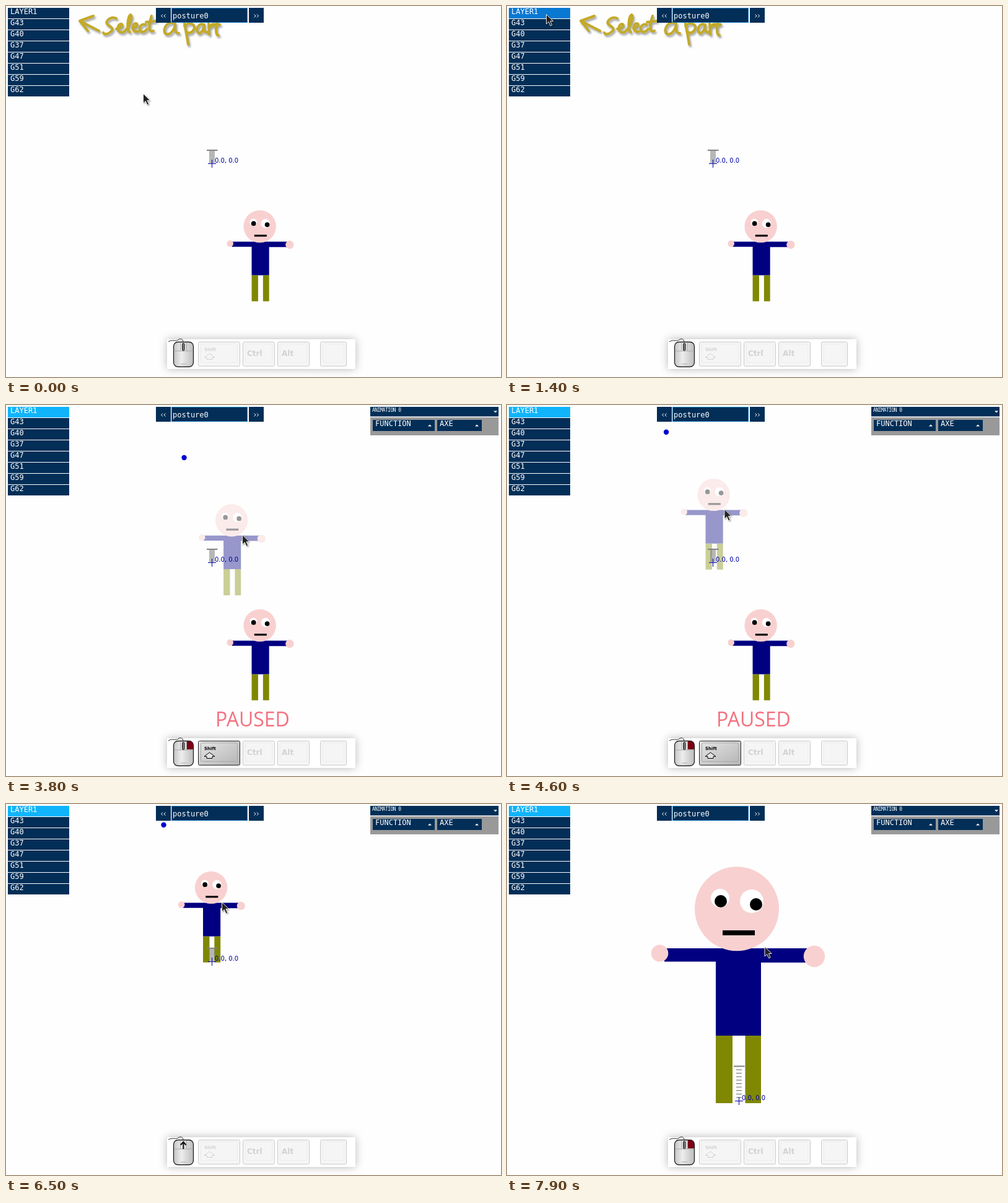
Animation of 799 by 599 pixels, one loop 8000 ms. Source, as an HTML page:

```html
<!DOCTYPE html>
<html lang="en">
<head>
<meta charset="utf-8">
<title>Posture editor</title>
<style>
html, body { margin: 0; width: 100%; height: 100%; overflow: hidden; background: #fefefe; }
svg { display: block; width: 799px; height: 599px; }
text { white-space: pre; }
.mono { font: 12px "DejaVu Sans Mono", monospace; fill: #fff; }
.tiny { font: 8px "DejaVu Sans Mono", monospace; letter-spacing: -.6px; fill: #fff; }
.coord { font: 10px "DejaVu Sans", sans-serif; fill: #0000a4; }
.paused { font: 32px "Open Sans", "Noto Sans", sans-serif; fill: #f4717f; }
.bar { fill: #022e57; }
.ink { fill: none; stroke: #c3aa27; stroke-width: 4; stroke-linecap: round; stroke-linejoin: round;
  filter: drop-shadow(2px 3px 1.5px rgba(0, 0, 0, .35)); }
.line { fill: none; stroke: #fff; stroke-width: 1; }

.skin { fill: #f9d0d0; }
.shirt { fill: #000080; }
.legs { fill: #7f8800; }
.eye { fill: #fff; }
.dark { fill: #000; }
.lit .skin { fill: rgba(38, 255, 1, .65); }
.lit .shirt { fill: #0eb135; }
.lit .legs { fill: #3fea05; }
.lit .eye { fill: rgba(20, 255, 10, .6); }
.lit .dark { fill: #10ff06; }

.cap { fill: #f5f5f5; stroke: #cacaca; }
.inner { fill: none; stroke: #ededed; }
.key text { font: bold 12px "DejaVu Sans", sans-serif; fill: #d2d2d2; }
.key .small { font-size: 7px; }
.up { fill: none; stroke: #d2d2d2; }
.on .cap { fill: url(#steel); stroke: #222; }
.on .inner { stroke: #aaa; }
.on text { fill: #000; }
.on .up { stroke: #000; fill: #e4e4e4; }
</style>
</head>
<body>
<svg viewBox="0 0 799 599">
  <defs>
    <linearGradient id="steel" x2="1" y2="1">
      <stop stop-color="#e6e6e6"/><stop offset="1" stop-color="#b4b4b4"/>
    </linearGradient>
    <linearGradient id="shell" x2="1">
      <stop stop-color="#c4c4c4"/><stop offset=".4" stop-color="#ededed"/><stop offset="1" stop-color="#bdbdbd"/>
    </linearGradient>
    <!-- doll in zoomed units, relative to the origin cross -->
    <g id="doll"><g transform="translate(-374.5 -479.5)">
      <path class="shirt" d="M254 233H487V256H410V374H337V254.5H254z"/>
      <path class="legs" d="M337 374h27v109h-27zM384.5 374H410v109h-25.5z"/>
      <circle class="skin" cx="246.5" cy="241" r="13.8"/>
      <circle class="skin" cx="496" cy="246" r="17.2"/>
      <circle class="skin" cx="371" cy="169.3" r="68"/>
      <circle class="eye" cx="344" cy="152" r="15"/>
      <circle class="eye" cx="395" cy="157" r="19"/>
      <circle class="dark" cx="345" cy="157" r="10"/>
      <circle class="dark" cx="402" cy="162" r="10"/>
      <path class="dark" d="M348 204h52v8h-52z"/>
    </g></g>
  </defs>
  <rect width="799" height="599" fill="#fefefe"/>

  <g id="hint" class="ink">
    <path d="M150 40L119 24L141 16M119 24L132 40"/>
    <path d="M178 20C170 15 158 25 164 30C172 35 175 38 167 43C163 46 158 46 157 43"/>
    <path d="M178 37C188 36 190 28 185 29C178 31 178 45 190 42C200 34 205 14 201 14C196 16 194 42 200 42"/>
    <path d="M204 36C212 34 214 28 209 28C202 30 203 44 213 41M225 30C216 27 212 41 220 42C224 42 226 39 228 37"/>
    <path d="M235 16C230 30 229 44 238 40M226 26L242 24"/>
    <path d="M272 28C262 22 250 38 258 45C266 48 273 36 273 28C272 38 273 44 279 44"/>
    <path d="M288 28C290 40 293 54 294 62M288 32C296 24 308 30 303 38C300 44 294 44 291 42"/>
    <path d="M319 30C310 26 305 40 311 44C317 44 320 34 320 30C319 38 320 44 326 42"/>
    <path d="M327 28L328 46M328 36C330 30 334 28 338 30M341 22C338 36 338 48 343 47M332 32L345 30"/>
  </g>

  <g id="list"></g>
  <path class="bar" d="M242 3h24v24h-24zM392 3h24v24h-24z"/>
  <rect class="bar" x="267.5" y="3.5" width="122" height="23" stroke="#1478bd"/>
  <path class="line" d="M253 13.5l-2.5 2.5 2.5 2.5M257.500 13.500l-2.500 2.500 2.500 2.500M400.500 13.500l2.500 2.500-2.500 2.500M405 13.500l2.500 2.500-2.500 2.500"/>
  <text class="mono" x="269" y="20">posture0</text>

  <g id="panel">
    <path class="bar" d="M588 3h207v15.500H588z"/>
    <path fill="#999" d="M588 20h207v29H588z"/>
    <path class="bar" d="M592 24h100v18H592zM696 24h72v18H696z"/>
    <path fill="#fff" d="M787 9.500h6l-3 3zM681 34.500h6l-3-3zM757 34.500h6l-3-3z"/>
    <text class="tiny" x="591" y="10.500">ANIMATION 0</text>
    <text class="mono" x="596" y="34">FUNCTION</text>
    <text class="mono" x="700" y="34">AXE</text>
  </g>

  <use id="figure" href="#doll"/>
  <use id="ghost" href="#doll" opacity=".4"/>
  <g id="ruler" fill="none"></g>
  <g id="origin">
    <path id="cross" fill="none" d="M-6.500 0H6.500M0 -6.500V6.500"/>
    <text class="coord" x="4.500" y="-1.500">0.0, 0.0</text>
  </g>
  <circle id="dot" r="4.200" fill="#0000d2"/>
  <text id="paused" class="paused" x="338" y="519">PAUSED</text>

  <rect x="260" y="538" width="304" height="48" fill="#fff" style="filter:drop-shadow(0 0 7px rgba(0,0,0,.28))"/>
  <path d="M262 542C268 538 274 542 278 539S286 538 286 543" fill="none" stroke="#222"/>
  <rect x="270.500" y="542.500" width="32" height="40" rx="7" fill="url(#shell)" stroke="#222" stroke-width="1.300"/>
  <path id="left" d="M282 543V556H271V549Q271 543 277 543z" fill="#7a0014"/>
  <path id="right" d="M292 543V556H302V549Q302 543 296 543z" fill="#7a0014"/>
  <path d="M271 557H302M281.500 543V557M291.500 543V557" stroke="#aaa" fill="none"/>
  <path d="M282 578h9" stroke="#aaa"/>
  <rect id="wheel" x="284.500" y="544.500" width="3.500" height="12" rx="1.700" fill="#777" stroke="#222"/>
  <path id="scroll" d="M286.300 557V546M282 550.500L286.300 545.500L290.500 550.500" fill="none" stroke="#111" stroke-width="2"/>
  <g id="keys"></g>

  <path id="cursor" d="M0 0V15.500L3.700 12L6.600 18.500L9.200 17.300L6.400 11H11.200z" fill="#222" stroke="#fff" stroke-width=".9"
    style="filter:drop-shadow(1px 1.500px 1px rgba(0,0,0,.4))"/>
</svg>
<script>
const $ = id => document.getElementById(id);
const LOOP = 8000, STEP = 100, ZOOM = 1.1 ** 10;
const PIVOT = [348.5, 158.5], ORIGIN = [332.5, 254.5], HOME = [78.5, 221];

$("list").innerHTML = ["LAYER1", "G43", "G40", "G37", "G47", "G51", "G59", "G62"].map((name, i) =>
  `<rect class="bar" x="3" y="${3 + 18 * i}" width="99" height="17"/>
   <text class="mono" x="7" y="${13 + 18 * i}">${name}</text>`).join("");
const layer = $("list").firstElementChild;

const key = (x, w, label) => `<g class="key">
  <rect class="cap" x="${x + .5}" y="542.5" width="${w - 1}" height="39" rx="2"/>
  <rect class="inner" x="${x + 4.5}" y="545.5" width="${w - 9}" height="30" rx="2"/>${label}</g>`;
$("keys").innerHTML =
  key(310, 68, `<text class="small" x="320" y="557">Shift</text>
    <path class="up" d="M328.5 561L337 567.500H333V570.500H324V567.500H320z"/>`) +
  key(382, 52, `<text x="389" y="565">Ctrl</text>`) +
  key(438, 52, `<text x="445" y="565">Alt</text>`) +
  key(507, 43, "");
const shift = $("keys").firstElementChild;

// Rows are [time, x, y], joined by straight motion.
const pointer = [[0, 221.5, 141.5], [600, 350, 286], [700, 350, 286], [1300, 63.5, 13.5], [1700, 63.5, 13.5],
  [1800, 199.5, 110.5], [1900, 199.5, 110.5], [2200, 441, 452], [2300, 434, 440], [2400, 434, 440], [2500, 427, 379.5]];
const drag = [[3200, 0, 0], [3900, -53, -198], [4200, -70, -206], [4600, -76, -211], [4700, -78, -212.5],
  [4800, -78, -212.5], [5700, -78.5, -221]];
const pan = [[7000, 0, 0], [7400, 26.5, 40], [7800, 65.5, 72], [7900, 67.5, 72]];

function at(track, t) {
  const i = track.findIndex(row => row[0] > t);
  if (i === 0) return track[0].slice(1);
  if (i < 0) return track[track.length - 1].slice(1);
  const a = track[i - 1], b = track[i], k = (t - a[0]) / (b[0] - a[0]);
  return [1, 2].map(n => a[n] + (b[n] - a[n]) * k);
}
const add = (...points) => points.reduce((p, q) => [p[0] + q[0], p[1] + q[1]]);
const place = (id, [x, y], scale = 1) =>
  $(id).setAttribute("transform", `translate(${x} ${y}) scale(${scale})`);
const show = (id, on) => { $(id).style.display = on ? "" : "none"; };

function drawRuler([x, y], zoom) {
  const gap = 2.16 * zoom;
  let ticks = "";
  for (let i = 1; i < 10; i++) ticks += `M${x - 4.5} ${y - gap * i}h9`;
  $("ruler").innerHTML = `<path d="${ticks}" stroke="#666"/>
    <path d="M${x - 8.5} ${y - gap * 10}h17.500" stroke="#808080" stroke-width="2"/>`;
}

function draw(t) {
  const within = (from, to) => t >= from && t < to;
  const moved = at(drag, t), shifted = at(pan, t);
  const zoom = t < 6600 ? 1 : t < 6700 ? 1.1 ** 5 : ZOOM;
  const origin = add(ORIGIN.map((o, i) => PIVOT[i] + (o - PIVOT[i]) * zoom), shifted);
  const scale = zoom / ZOOM;

  place("figure", t < 6200 ? add(origin, HOME) : origin, scale);
  $("figure").setAttribute("class", t >= 1300 ? "lit" : "");
  place("ghost", add(origin, HOME, moved), scale);
  show("ghost", within(3200, 6200));

  drawRuler(origin, zoom);
  place("origin", origin);
  $("cross").setAttribute("stroke", within(6700, 7900) ? "#000" : "#0000a0");
  place("dot", add([333, 254.7], moved));
  show("dot", within(3100, 6600));
  show("paused", within(3100, 6200));

  layer.style.fill = t >= 1600 ? "#10b4fb" : t >= 1300 ? "#0878d2" : "";
  show("hint", t < 1600);
  show("panel", t >= 1600);

  show("left", within(1500, 1800));
  show("right", within(3200, 6100) || t >= 7000);
  show("scroll", within(6500, 6700));
  show("wheel", !within(6500, 6700));
  shift.classList.toggle("on", within(2500, 6300));

  place("cursor", add(at(pointer, t), moved, shifted));
}

const start = performance.now();
function tick() {
  const t = (performance.now() - start) % LOOP;
  draw(Math.floor(t / STEP) * STEP);
  requestAnimationFrame(tick);
}
tick();
</script>
</body>
</html>
```
